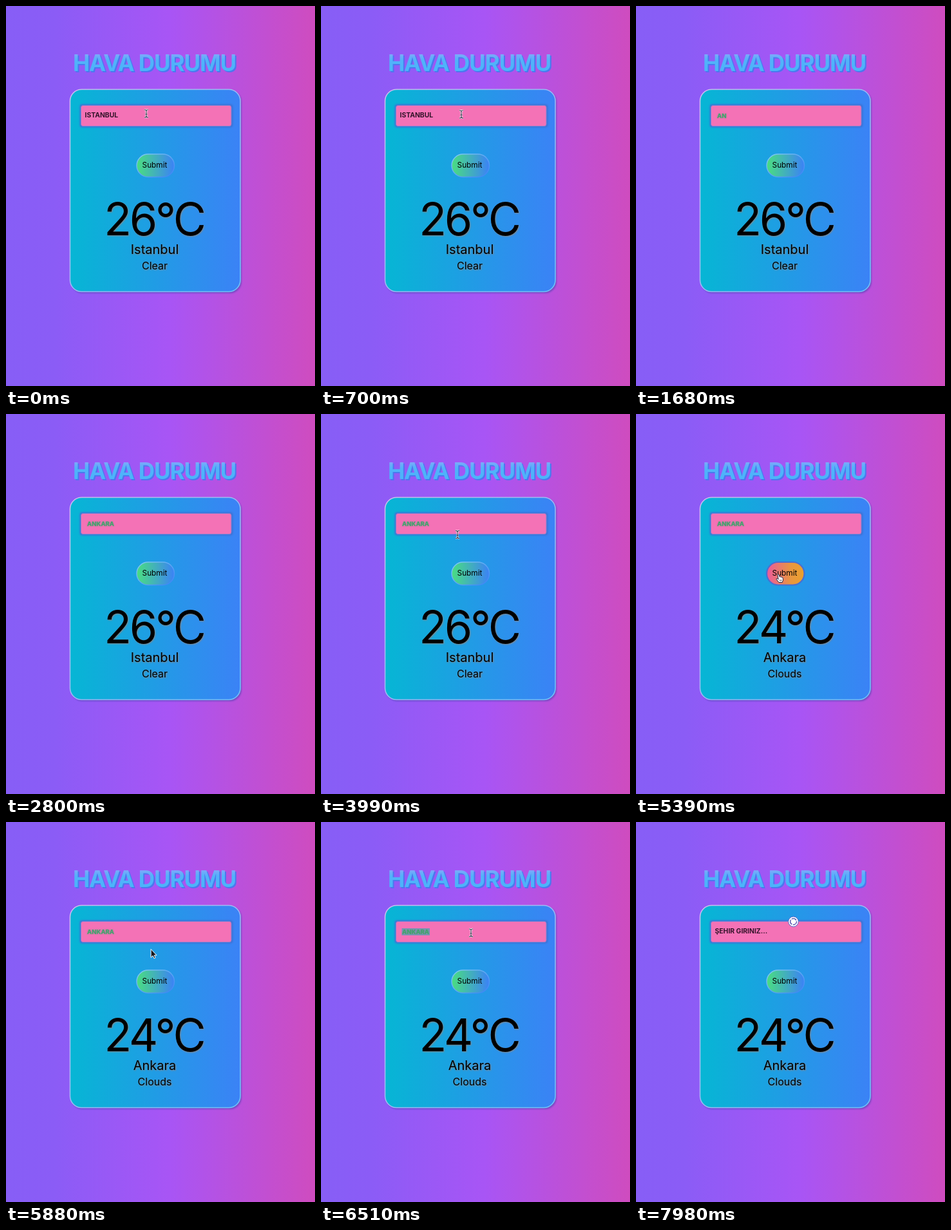
Write an HTML page that moves like this. It is 480 by 590 pixels and loops after 8 s.

```html
<!DOCTYPE html>
<html lang="tr">
<head>
<meta charset="utf-8">
<title>Hava Durumu</title>
<style>
  html, body { margin: 0; width: 100%; height: 100%; overflow: hidden; }
  svg { display: block; width: 480px; height: 590px; font-family: Inter, Roboto, sans-serif; }
  .mid { text-anchor: middle; }
  .title { font-size: 35px; font-weight: 700; letter-spacing: -1.1px; fill: url(#titleFill); filter: drop-shadow(2px 2px .7px #4a78ee); }
  .reading { filter: drop-shadow(1.8px 1.8px .8px #80868a); }
  .temp { font-size: 70px; letter-spacing: -3.2px; }
  .city { font-size: 20px; }
  .sky { font-size: 16px; }
  .submit { font-size: 11.8px; }
  .value { font-size: 10.4px; font-weight: 700; fill: #35142b; }
  .value.focused { font-size: 9.6px; fill: #3ba56c; filter: drop-shadow(.8px .8px .8px #71917a); }
</style>
</head>
<body>
<svg viewBox="0 0 480 590">
  <defs>
    <linearGradient id="page">
      <stop stop-color="#875ef6"/><stop offset=".16" stop-color="#8b5cf6"/>
      <stop offset=".53" stop-color="#a855f5"/><stop offset="1" stop-color="#cf4cbf"/>
    </linearGradient>
    <linearGradient id="cardFill"><stop stop-color="#06b6d4"/><stop offset="1" stop-color="#3b82f6"/></linearGradient>
    <linearGradient id="cardEdge" x2="1" y2="1">
      <stop stop-color="#cdbdee"/><stop offset=".5" stop-color="#9db8f4"/><stop offset="1" stop-color="#6cc3f8"/>
    </linearGradient>
    <linearGradient id="titleFill" x2="0" y2="1">
      <stop offset=".15" stop-color="#86a6fb"/><stop offset=".4" stop-color="#52b2fa"/><stop offset="1" stop-color="#48b5fa"/>
    </linearGradient>
    <linearGradient id="idle"><stop stop-color="#4ade80"/><stop offset="1" stop-color="#3b82f6"/></linearGradient>
    <linearGradient id="idleEdge" x2="1" y2="1"><stop stop-color="#82cdf0"/><stop offset="1" stop-color="#3b82f6"/></linearGradient>
    <linearGradient id="hot"><stop stop-color="#ec5a9c"/><stop offset=".65" stop-color="#e8973f"/><stop offset="1" stop-color="#eba12c"/></linearGradient>
    <filter id="soft" x="-20%" y="-20%" width="140%" height="140%"><feGaussianBlur stdDeviation="1.1"/></filter>
  </defs>

  <rect width="480" height="590" fill="url(#page)"/>
  <text class="title mid" x="230.5" y="101">HAVA DURUMU</text>

  <rect x="101" y="131" width="265" height="315" rx="18" fill="#5546b5" opacity=".65" filter="url(#soft)"/>
  <rect x="99.5" y="129.5" width="264.5" height="314" rx="18" fill="url(#cardFill)" stroke="url(#cardEdge)" stroke-width="1.6"/>

  <rect x="114.5" y="152.5" width="238" height="36" rx="4" fill="#3d72d6" filter="url(#soft)"/>
  <rect x="116.5" y="154.5" width="233.5" height="32" rx="3" fill="#f472b6" stroke="#8581d0"/>
  <rect id="selection" x="125.5" y="165" width="43.5" height="11" fill="#7795b5"/>
  <text id="value" class="value"></text>

  <rect id="button" x="203" y="230" width="58.5" height="35.5" rx="17.75"/>
  <text class="submit mid" x="231" y="251">Submit</text>

  <g class="reading mid">
    <text id="temp" class="temp" x="230" y="355.5"></text>
    <text id="city" class="city" x="231" y="385"></text>
    <text id="sky" class="sky" x="231" y="408.5"></text>
  </g>

  <g id="pointer">
    <g id="beam" fill="none">
      <path d="M-3 -6Q0 -6 0 -4Q0 -6 3 -6M0 -4V4M-3 6Q0 6 0 4Q0 6 3 6M-1.5 1H1.5" stroke="#fff" stroke-width="2.6"/>
      <path d="M-3 -6Q0 -6 0 -4Q0 -6 3 -6M0 -4V4M-3 6Q0 6 0 4Q0 6 3 6M-1.5 1H1.5" stroke="#37304a" stroke-width="1.1"/>
    </g>
    <path id="arrow" d="M-4 -7V6L-1 3.2L1 7.5L3 6.5L1.2 2.5H5z" fill="#15151d" stroke="#fff"/>
    <g id="hand" stroke="#20243f" stroke-width="1" stroke-linejoin="round">
      <path d="M-3.2 -5.5Q-2 -7 -1 -5.5L.2 -2Q1.3 -3 2.2 -1.8Q3.3 -2.5 4 -1.2Q5.3 -1.4 5.4 .5V3L4.2 6.5H-1L-4.8 1.8Q-5.4 0 -3.4 .4L-1.8 1.7z" fill="#fff"/>
      <path d="M.7 2.3V4.6M2.5 2.3V4.6" fill="none" stroke-width=".8"/>
    </g>
    <g id="wheel" fill="none">
      <circle r="7.8" fill="#fff" stroke="#5363c9"/>
      <circle r="4.8" stroke="#4c4fae" stroke-width="1.4" stroke-dasharray="8 1.6"/>
    </g>
  </g>
</svg>
<script>
  const LOOP = 8000;
  const byId = id => document.getElementById(id);
  const show = (id, on) => byId(id).style.display = on ? '' : 'none';

  // time, x, y
  const path = [
    [0, 218, 167], [840, 218, 168], [3400, 218, 171], [3850, 214, 174],
    [4350, 204, 242], [4690, 202, 266], [5040, 223, 255], [5600, 223, 255],
    [6090, 233, 172], [6900, 233, 172], [7600, 243, 164], [7900, 244.5, 154.7], [8000, 244.5, 154.7]
  ];
  const pointers = [
    [0, 'beam'], [980, ''], [3400, 'beam'], [4060, 'arrow'], [4270, 'hand'],
    [5740, 'arrow'], [5950, 'beam'], [7700, 'wheel']
  ];
  // time, text, focused, selected
  const entries = [
    [0, 'ISTANBUL', false, false], [840, 'ISTANBUL', true, true], [1260, '', true, false],
    [1470, 'A', true, false], [1610, 'AN', true, false], [1820, 'ANK', true, false],
    [2030, 'ANKA', true, false], [2240, 'ANKAR', true, false], [2450, 'ANKARA', true, false],
    [6300, 'ANKARA', true, true], [7700, 'ŞEHIR GIRINIZ...', false, false]
  ];
  const weather = [[0, '26°C', 'Istanbul', 'Clear'], [5250, '24°C', 'Ankara', 'Clouds']];

  const current = (steps, t) => steps.findLast(step => step[0] <= t);

  function position(t) {
    const i = Math.max(1, path.findIndex(p => p[0] > t));
    const [a, b] = [path[i - 1], path[i]];
    const k = (t - a[0]) / (b[0] - a[0]);
    const ease = k * k * (3 - 2 * k);
    return [a[1] + (b[1] - a[1]) * ease, a[2] + (b[2] - a[2]) * ease];
  }

  function draw(t) {
    const [, text, focused, selected] = current(entries, t);
    const value = byId('value');
    value.textContent = text;
    value.classList.toggle('focused', focused);
    value.setAttribute('x', focused ? 126 : 122.5);
    value.setAttribute('y', focused ? 174 : 173);
    show('selection', selected);

    const [, temp, city, sky] = current(weather, t);
    Object.entries({ temp, city, sky }).forEach(([id, label]) => byId(id).textContent = label);

    const kind = current(pointers, t)[1];
    ['beam', 'arrow', 'hand', 'wheel'].forEach(id => show(id, id === kind));
    byId('pointer').setAttribute('transform', `translate(${position(t)})`);

    const hover = kind === 'hand';
    const button = byId('button');
    button.setAttribute('fill', hover ? 'url(#hot)' : 'url(#idle)');
    button.setAttribute('stroke', hover ? '#4a6fd0' : 'url(#idleEdge)');
    button.setAttribute('stroke-width', hover ? 2.2 : 1.5);
  }

  const start = performance.now();
  function tick() {
    draw((performance.now() - start) % LOOP);
    requestAnimationFrame(tick);
  }
  tick();
</script>
</body>
</html>
```
